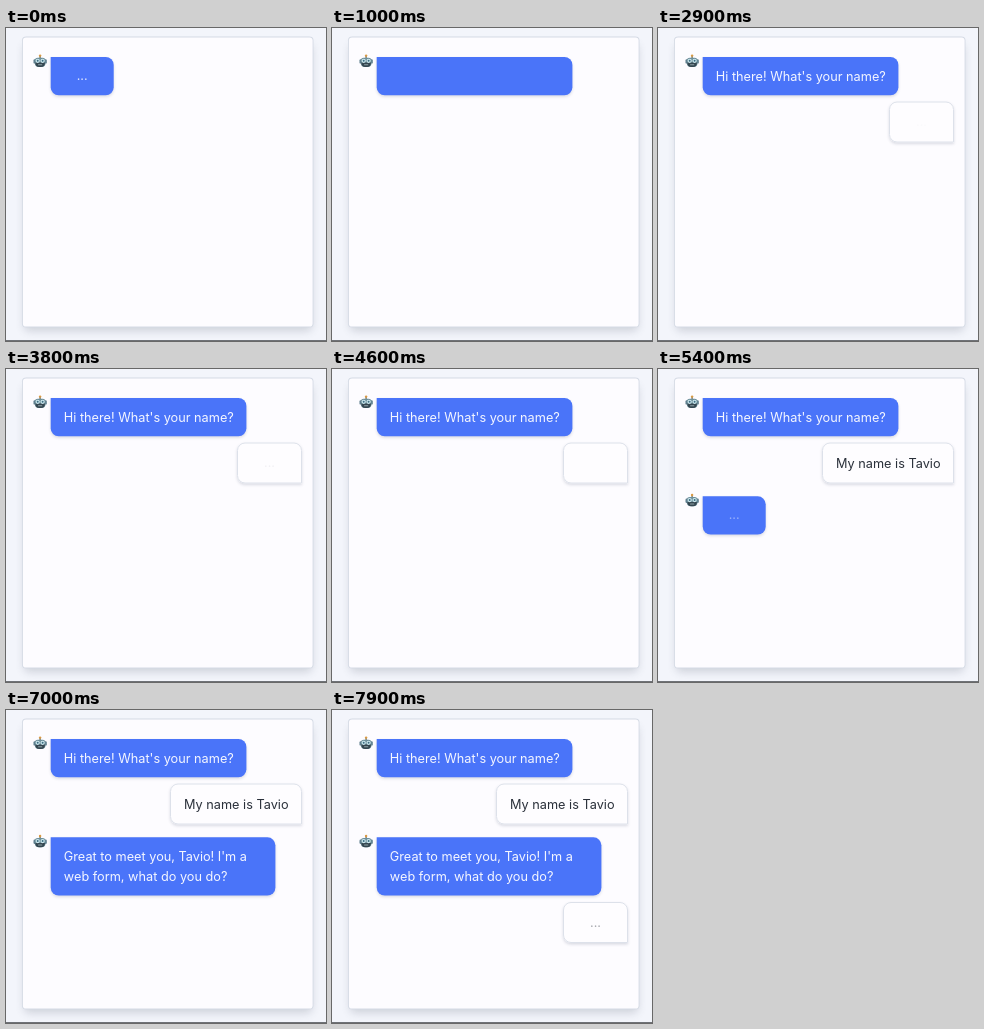
Write an HTML page with a canvas that moves like this. It is 320x313 px and loops after 8 s.

```html
<!DOCTYPE html>
<html lang="en">
<head>
<meta charset="utf-8">
<style>
html, body { margin: 0; width: 100%; height: 100%; overflow: hidden; background: #f3f5fb; }
canvas { display: block; width: 320px; height: 313px; }
</style>
</head>
<body>
<canvas id="chat"></canvas>
<script>
const LOOP = 8000, PULSE = 850, FADE = 550;
const BLUE = '#4a74f9', INK = '#2a303a';
const canvas = document.getElementById('chat');
const ctx = canvas.getContext('2d');
const scale = window.devicePixelRatio || 1;
canvas.width = 320 * scale;
canvas.height = 313 * scale;

// start: bubble appears, stop: dots end, open: bubble takes its full size
const messages = [
  { bot: true, y: 29, h: 38.3, w: 195.7, start: -320, stop: 530, open: 1000,
    lines: ["Hi there! What's your name?"] },
  { bot: false, y: 73.5, h: 41, w: 132, start: 2000, stop: 4550, open: 4650,
    lines: ['My name is Tavio'] },
  { bot: true, y: 127.3, h: 58.2, w: 224.7, start: 5200, stop: 6050, open: 6150,
    lines: ["Great to meet you, Tavio! I'm a", 'web form, what do you do?'] },
  { bot: false, y: 192, h: 41, w: 65, start: 7400, stop: LOOP, open: LOOP, lines: [] }
];

const clamp = v => Math.max(0, Math.min(1, v));
const smooth = v => v * v * (3 - 2 * v);

function box(x, y, w, h, radii, fill) {
  ctx.beginPath();
  ctx.roundRect(x, y, w, h, radii);
  ctx.fillStyle = fill;
  ctx.fill();
}

function shadow(color, blur, dy) {
  ctx.shadowColor = color;
  ctx.shadowBlur = blur * scale;
  ctx.shadowOffsetY = dy * scale;
}

function outline(color) {
  ctx.lineWidth = 1;
  ctx.strokeStyle = color;
  ctx.stroke();
}

function dot(x, y, r, fill) {
  ctx.beginPath();
  ctx.arc(x, y, r, 0, Math.PI * 2);
  ctx.fillStyle = fill;
  ctx.fill();
}

function robot(x, y) {
  ctx.save();
  ctx.translate(x, y);
  box(5.6, 1, 1.4, 3, 0, '#7b7560');
  dot(6.3, 1.2, 1.2, '#d99a45');
  box(-0.3, 4.8, 2.4, 4.4, 1.2, '#5c7c8c');
  box(10.6, 4.8, 2.4, 4.4, 1.2, '#5c7c8c');
  box(1, 3.3, 10.7, 9.2, [3, 3, 4, 4], '#6d8f9b');
  box(1.6, 8.2, 9.5, 4.3, [0, 0, 4, 4], '#354650');
  for (const ex of [3.9, 8.8]) {
    dot(ex, 6.4, 2.1, '#cfeaf0');
    dot(ex, 6.4, 1, '#3c6d82');
  }
  box(4.2, 9.9, 4.3, 1, 0.5, '#8fa3a8');
  ctx.restore();
}

function bubble(m, t) {
  if (t < m.start) return;
  const open = t >= m.open;
  const w = open ? m.w : m.bot ? 63 : 65;
  const h = open || !m.bot ? m.h : 38.3;
  const x = m.bot ? 44.7 : 296 - w;

  ctx.save();
  shadow('rgba(30,45,80,0.16)', 3, 1.5);
  if (m.bot) {
    box(x, m.y, w, h, [0, 8, 8, 8], BLUE);
  } else {
    box(x, m.y, w, h, [8, 8, 0, 8], '#fefdff');
    shadow('transparent', 0, 0);
    ctx.beginPath();
    ctx.roundRect(x + 0.5, m.y + 0.5, w - 1, h - 1, [7.5, 7.5, 0, 7.5]);
    outline('#dde1ea');
  }
  ctx.restore();
  if (m.bot) robot(27.8, m.y - 2.6);

  ctx.save();
  if (open) {
    ctx.globalAlpha = smooth(clamp((t - m.open) / FADE));
    ctx.fillStyle = m.bot ? '#f4f6ff' : INK;
    m.lines.forEach((line, i) =>
      ctx.fillText(line, x + (m.bot ? 13.1 : 14), m.y + (m.bot ? 23.8 : 25.7) + i * 20));
  } else if (t < m.stop) {
    ctx.globalAlpha = Math.sin(Math.PI * (t - m.start) / PULSE) ** 2;
    ctx.textAlign = 'center';
    ctx.fillStyle = m.bot ? '#ffffff' : '#9b9da4';
    ctx.fillText('...', x + w / 2, m.y + (m.bot ? 22.9 : 24.6));
  }
  ctx.restore();
}

function draw(t) {
  ctx.setTransform(scale, 0, 0, scale, 0, 0);
  ctx.fillStyle = '#f3f5fb';
  ctx.fillRect(0, 0, 320, 313);

  ctx.save();
  shadow('rgba(60,70,90,0.2)', 9, 5);
  box(18, 11, 288, 287, 5, '#fdfcff');
  ctx.restore();
  box(16, 8.5, 291.5, 291, 4, '#d5dbe5');
  box(16.9, 9.4, 289.7, 289.2, 3.2, '#fdfcff');
  ctx.fillStyle = '#6f7277';
  ctx.fillRect(0, 312, 320, 1);

  ctx.font = '12.72px Inter, "Open Sans", sans-serif';
  for (const m of messages) bubble(m, t);
}

const begin = performance.now();
function tick() {
  draw((performance.now() - begin) % LOOP);
  requestAnimationFrame(tick);
}
tick();
</script>
</body>
</html>
```
